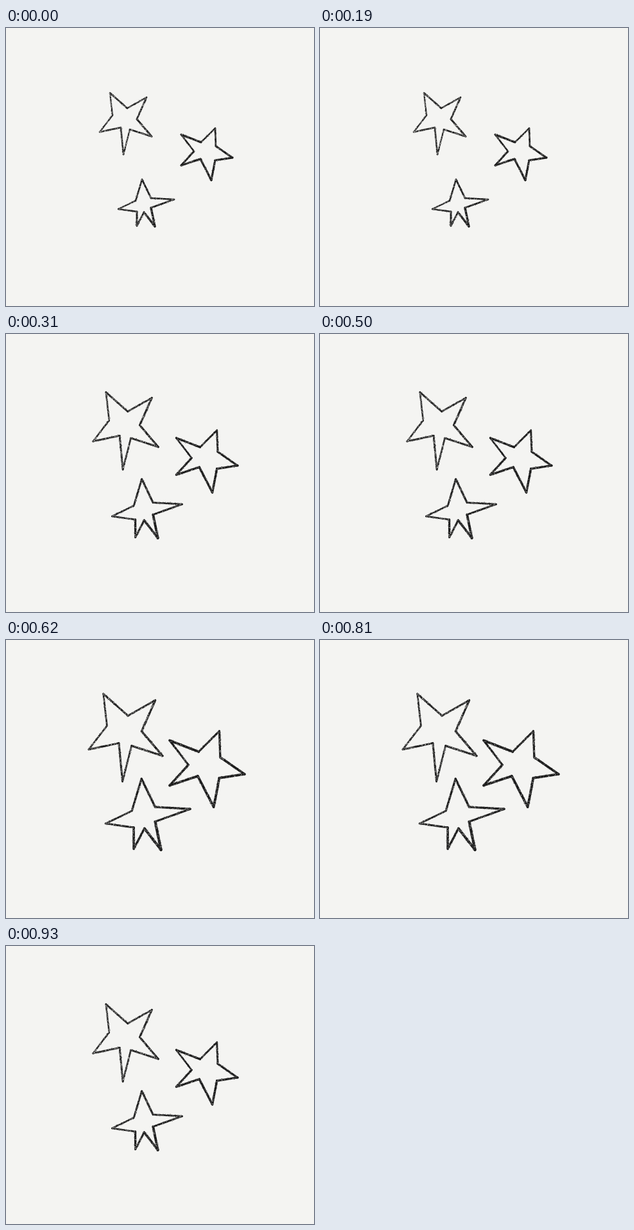
Recreate the animation shown at these times as an HTML page with a canvas. Size 480 px wide and 433 px high, loop 1240 ms.

```html
<!DOCTYPE html>
<html lang="en">
<head>
<meta charset="utf-8">
<title>Pulsing stars</title>
<style>
  html, body { margin: 0; width: 100%; height: 100%; overflow: hidden; background: #f4f4f2; }
  canvas { display: block; }
</style>
</head>
<body>
<canvas id="stage" width="480" height="433"></canvas>
<script>
const ctx = document.getElementById('stage').getContext('2d');
const PAPER = '#f4f4f2', INK = '#1c1c1c';
const STEP = 310, POSES = [0, 1, 2, 1];

// Each point: x, y, weight of the line leading to the next point
const stars = [
  { center: [186.5, 141.7], scales: [1, 1.255, 1.42], grain: 0.5, points: [
    [162, 101, 2.9], [189, 125, 2.7], [219, 108, 3], [204, 142, 3.1], [227, 169, 3],
    [193, 158, 2.6], [183, 197, 2.9], [179, 155, 2.8], [146, 162, 2.5], [166, 136, 2.5]] },
  { center: [312, 186.7], scales: [1, 1.195, 1.46], grain: 0.25, points: [
    [326, 156, 3], [327, 184, 3.3], [353, 202, 3.4], [326, 206, 3.5], [320, 237, 3.5],
    [303, 204, 3.4], [273, 214, 3.2], [293, 192, 2.8], [273, 166, 3.5], [304, 178, 2.8]] },
  { center: [213.5, 274.4], scales: [1, 1.255, 1.517], grain: 0.33, points: [
    [212, 236, 3.1], [226, 265, 3], [262, 267, 2.9], [226, 280, 3.8], [232, 309, 3.6],
    [215, 287, 3], [204, 308, 3.3], [204, 286, 2.6], [175, 282, 2.5], [202, 269, 2.9]] }
];

let seed;
function random() {
  seed = (seed * 16807) % 2147483647;
  return seed / 2147483647;
}

// Scatter square specks around a line
function specks(a, b, width, density, color, size) {
  const dx = b[0] - a[0], dy = b[1] - a[1], length = Math.hypot(dx, dy);
  ctx.fillStyle = color;
  for (let i = 0; i < length * density; i++) {
    const t = random(), off = (random() - 0.5) * width / length;
    const s = size * (0.6 + random() * 0.6);
    ctx.globalAlpha = 0.2 + random() * 0.4;
    ctx.fillRect(a[0] + dx * t - dy * off - s / 2, a[1] + dy * t + dx * off - s / 2, s, s);
  }
  ctx.globalAlpha = 1;
}

function drawStar({ center, scales, grain, points }, pose) {
  const scale = scales[pose];
  const placed = points.map(p => [0, 1].map(k => center[k] + (p[k] - center[k]) * scale));
  const edges = placed.map((a, i) =>
    [a, placed[(i + 1) % placed.length], points[i][2] * Math.sqrt(scale)]);

  ctx.strokeStyle = INK;
  ctx.lineCap = 'round';
  for (const [a, b, width] of edges) {
    ctx.lineWidth = width * 0.88;
    ctx.beginPath();
    ctx.moveTo(...a);
    ctx.lineTo(...b);
    ctx.stroke();
  }
  for (const [a, b, width] of edges) {
    specks(a, b, width * 1.25, 1.2, INK, 1);
    specks(a, b, width, grain * 3, PAPER, 1.1);
  }
}

function draw(pose) {
  seed = 4711 + pose * 97;
  ctx.fillStyle = PAPER;
  ctx.fillRect(0, 0, 480, 433);
  stars.forEach(star => drawStar(star, pose));
}

const start = performance.now();
let shown = -1;
function tick() {
  const elapsed = performance.now() - start;
  const pose = POSES[Math.floor(elapsed / STEP) % POSES.length];
  if (pose !== shown) draw(shown = pose);
  requestAnimationFrame(tick);
}
tick();
</script>
</body>
</html>
```
